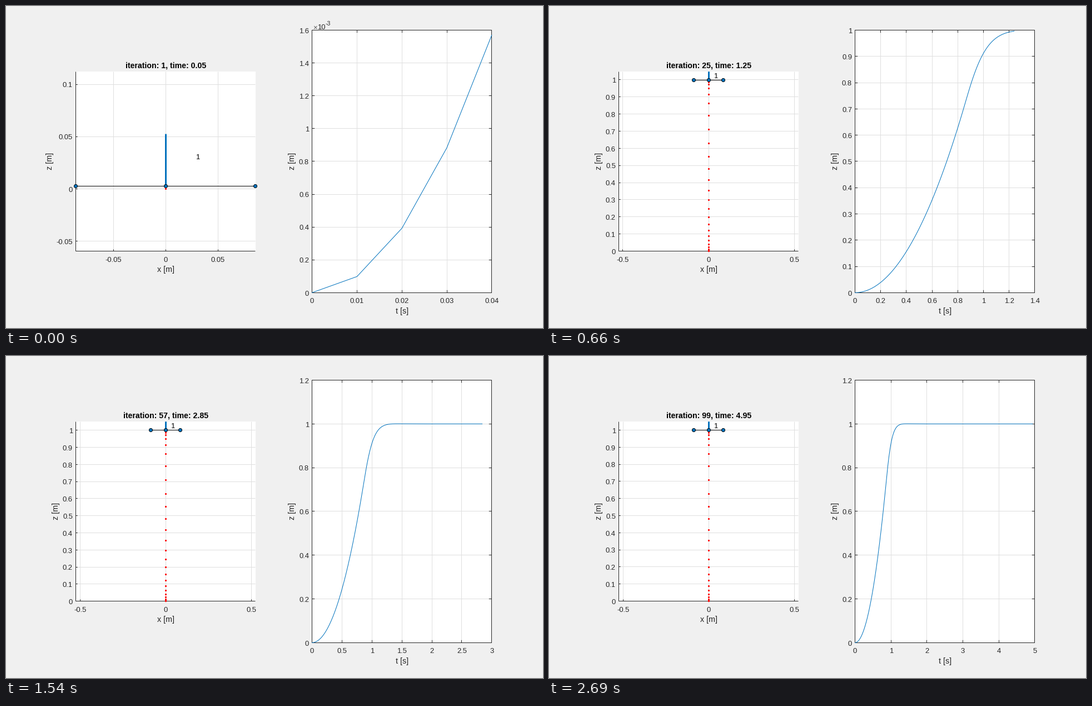
Recreate the animation shown at these times as a matplotlib script. Size 966 px wide and 580 px high, loop 2790 ms.

```python
import math

import numpy as np
import matplotlib.pyplot as plt
from matplotlib.animation import FuncAnimation
from matplotlib.collections import LineCollection, PatchCollection
from matplotlib.patches import Circle, Rectangle

W, H, DPI = 966, 580, 64
PX = 72 / DPI                      # points per pixel
LOOP, STEP_MS = 2790, 10
BLUE, INK, GRID = "#0072BD", "#262626", "#dfdfdf"
ARM, MAST = 0.086, 0.05
LEFT = (125.6, 118.2, 448.9, 441.6)    # x0, top, x1, bottom
RIGHT = (550.6, 43.5, 873.8, 516.3)

plt.rcParams["font.family"] = "Liberation Sans"
fig = plt.figure(figsize=(W / DPI, H / DPI), dpi=DPI, facecolor="#f0f0f0")
ax = fig.add_axes([0, 0, 1, 1])
ax.set_xlim(0, W)
ax.set_ylim(H, 0)
ax.axis("off")
for x0, top, x1, bottom in (LEFT, RIGHT):
    ax.add_patch(Rectangle((x0, top), x1 - x0, bottom - top, fc="white", lw=0, zorder=0))


def simulate(seconds=5.0, dt=1e-4, kp=120.0, kd=19.8, g=9.81):
    """Height under a PD controller with limited thrust, sampled every 10 ms."""
    z = v = 0.0
    out = []
    for i in range(int(round(seconds / dt)) + 1):
        if i % 100 == 0:
            out.append(z)
        a = min(max(kp * (1 - z) - kd * v, -g), 0.2 * g)
        z += v * dt + 0.5 * a * dt * dt
        v += a * dt
    return np.array(out)


HEIGHT = simulate()


def snap(v):
    """Centre of the pixel that holds v."""
    return math.floor(v) + 0.5


def text_width(s, size=13):
    return size * sum({".": 0.278, "-": 0.333}.get(c, 0.556) for c in s)


def nice_step(top, most):
    """Smallest 1-2-5 step that covers 0..top in at most `most` intervals."""
    for power in range(-5, 2):
        for base in (1, 2, 5):
            step = base * 10.0 ** power
            n = math.ceil(top / step - 1e-9)
            if n <= most:
                return step, n * step
    return top, top


def ticks_in(lo, hi, step):
    first = math.ceil(lo / step - 1e-6)
    last = math.floor(hi / step + 1e-6)
    return [k * step for k in range(first, last + 1)]


class Scene:
    def __init__(self):
        self.artists = []

    def text(self, x, y, s, size=13, color=INK, **kw):
        kw = {"ha": "center", "va": "baseline", **kw}
        self.artists.append(ax.text(x, y, s, fontsize=size * PX, color=color, **kw))

    def collect(self, collection):
        # Points are already on pixel centres, so the renderer must not round them again.
        collection.set_snap(False)
        self.artists.append(ax.add_collection(collection, autolim=False))

    def lines(self, segments, color, zorder, lw=1):
        self.collect(LineCollection(segments, colors=color, linewidths=lw * PX,
                                    capstyle="butt", zorder=zorder))

    def discs(self, points, radius, zorder, **kw):
        self.collect(PatchCollection([Circle(p, radius) for p in points],
                                     zorder=zorder, **kw))

    def axes(self, box, xlim, ylim, xstep, ystep, names, full, scale=1):
        """Grid, ticks and labels; returns the two data-to-pixel maps."""
        x0, top, x1, bottom = box

        def fx(v):
            return x0 + (v - xlim[0]) / (xlim[1] - xlim[0]) * (x1 - x0)

        def fy(v):
            return bottom - (v - ylim[0]) / (ylim[1] - ylim[0]) * (bottom - top)

        l, t, r, b = (snap(v) for v in box)
        size = 0.01 * max(x1 - x0, bottom - top)
        grid, frame = [], [[(l, t), (l, b)], [(l, b), (r, b)]]
        if full:
            frame += [[(l, t), (r, t)], [(r, t), (r, b)]]
        for v in ticks_in(*xlim, xstep):
            x = snap(fx(v))
            grid.append([(x, t), (x, b)])
            frame.append([(x, b), (x, b - size)])
            if full:
                frame.append([(x, t), (x, t + size)])
            self.text(fx(v), bottom + 19, f"{round(v, 6):g}")
        widest = 0
        for v in ticks_in(*ylim, ystep):
            y = snap(fy(v))
            grid.append([(l, y), (r, y)])
            frame.append([(l, y), (l + size, y)])
            if full:
                frame.append([(r, y), (r - size, y)])
            label = f"{round(v * scale, 6):g}"
            widest = max(widest, text_width(label))
            self.text(x0 - 5.6, fy(v) + 5.3, label, ha="right")
        self.lines(grid, GRID, 1)
        self.lines(frame, INK, 2)
        self.text((x0 + x1) / 2 + 0.5, bottom + 37.6, names[0], 14.2)
        self.text(x0 - 5.6 - widest - 7.6, (top + bottom) / 2 - 0.5, names[1], 14.2,
                  rotation=90, rotation_mode="anchor")
        return fx, fy

    def drone(self, it):
        z = HEIGHT[5 * it]
        top = z + MAST
        half = max(ARM, top / 2)
        mid = top / 2
        xstep = 0.05 if half < 0.16 else 0.1 if half < 0.4 else 0.2 if half < 0.5 else 0.5
        ystep = 0.05 if half < 0.25 else 0.1
        fx, fy = self.axes(LEFT, (-half, half), (mid - half, mid + half),
                           xstep, ystep, ("x [m]", "z [m]"), False)
        x, y = snap(fx(0)), snap(fy(z))
        hubs = [(snap(fx(v)), y) for v in (-ARM, 0, ARM)]
        self.discs([(x, snap(fy(h))) for h in HEIGHT[:5 * it + 1:5]], 1.6, 3,
                   facecolors="red", linewidths=0)
        self.lines([[(x, y), (x, fy(top))]], BLUE, 4, 3)
        self.lines([hubs], "black", 5)
        self.discs(hubs, 3.1, 6, facecolors=BLUE, edgecolors="black", linewidths=0.9 * PX)
        self.text(fx(ARM / 3) - 0.5, fy(z + ARM / 3) + 5.4, "1", color="black",
                  ha="left", zorder=7)
        self.text(288, 111, f"iteration: {it}, time: {it * 0.05:.2f}", 14.15,
                  "black", weight="bold")

    def graph(self, it):
        n = 5 * it
        t, z = np.arange(n) * 0.01, HEIGHT[:n]
        xstep, xmax = nice_step(t[-1], 7 if t[-1] < 0.1 else 8)
        ystep, ymax = nice_step(z.max(), 10)
        small = ymax < 0.01
        fx, fy = self.axes(RIGHT, (0, xmax), (0, ymax), xstep, ystep,
                           ("t [s]", "z [m]"), True, 1000 if small else 1)
        self.artists += ax.plot(fx(t), fy(z), lw=PX, color=BLUE, zorder=3)
        if small:
            self.text(556, 42, "×", color="#555555")
            self.text(560.3, 42, "10", ha="left")
            self.text(575, 35, "-3", 10.5, ha="left")


def build(it):
    scene = Scene()
    scene.drone(it)
    scene.graph(it)
    return scene.artists


STARTS = [110 * k for k in range(19)] + [2080, 2180, 2280, 2390, 2490, 2590, 2690]
scenes = [build(round(ms / 27.45) + 1) for ms in STARTS]


def draw(n):
    now = sum(ms <= n * STEP_MS for ms in STARTS) - 1
    for k, artists in enumerate(scenes):
        for a in artists:
            a.set_visible(k == now)
    return scenes[now]


anim = FuncAnimation(fig, draw, frames=LOOP // STEP_MS, interval=STEP_MS,
                     init_func=lambda: draw(0), repeat=True, repeat_delay=0, blit=False)
plt.show()
```
